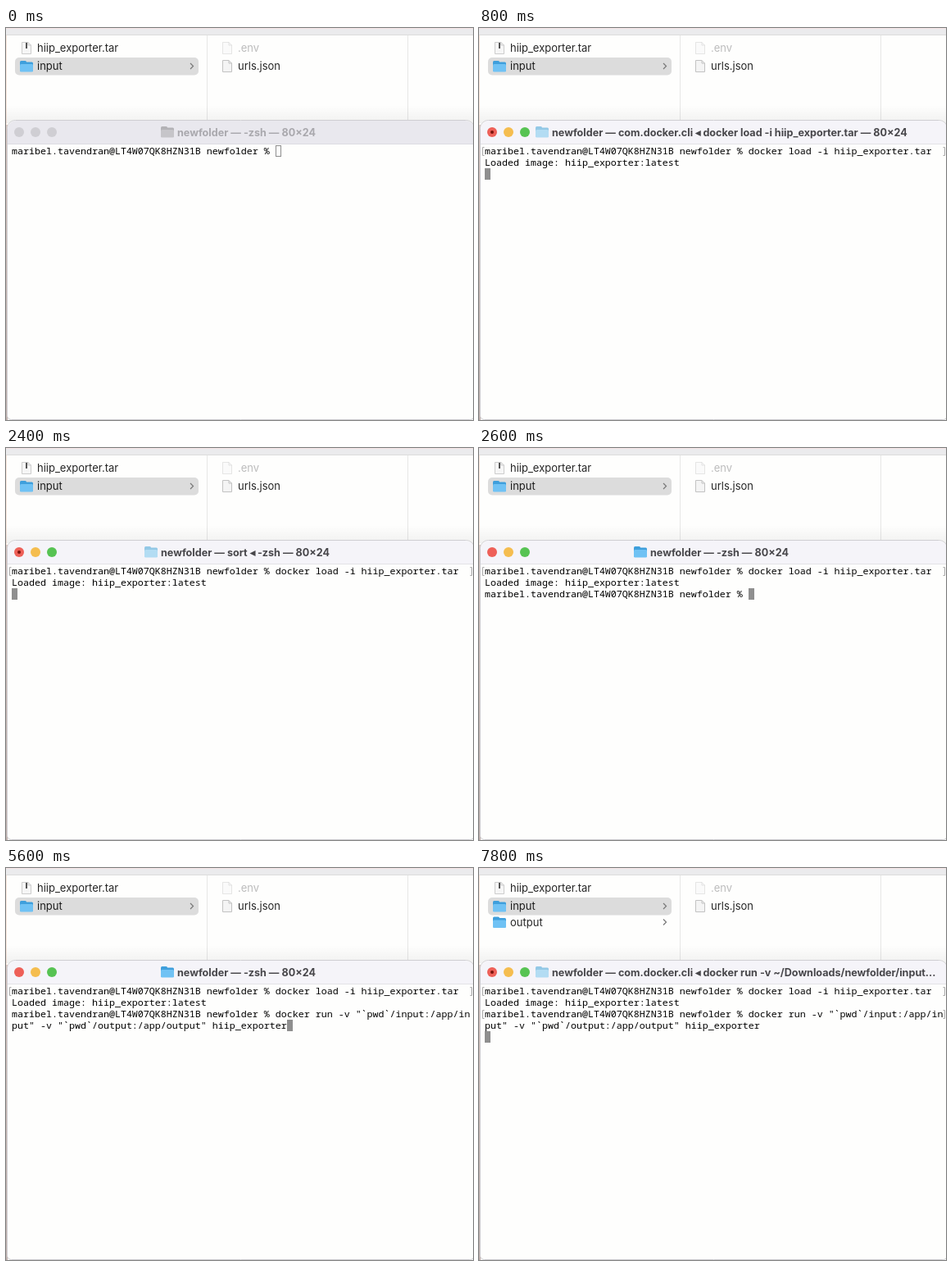
An HTML page with a canvas that plays this animation: 570x478 px, repeating every 8 s.

```html
<!DOCTYPE html>
<html lang="en">
<head>
<meta charset="utf-8">
<title>Terminal session</title>
<style>
html, body { margin: 0; width: 570px; height: 478px; overflow: hidden; background: #fefefd; }
canvas { display: block; }
</style>
</head>
<body>
<canvas id="stage" width="570" height="478"></canvas>
<script>
const ctx = document.getElementById('stage').getContext('2d');
const LOOP = 8000, CELL = 7, ROW = 14, LEFT = 7, TOP = 143;
const MONO = '500 11.667px "Noto Sans Mono", "DejaVu Sans Mono", monospace';
const UI = '13px Inter, "Open Sans", sans-serif';
const BOLD = '700 12.6px Inter, "Open Sans", sans-serif';

const PROMPT = 'maribel.tavendran@LT4W07QK8HZN31B newfolder % ';
const LOAD = 'docker load -i hiip_exporter.tar';
const RUN = ['docker run -v "`pwd`/input:/app/in', 'put" -v "`pwd`/output:/app/output" hiip_exporter'];
const LOADED = 'Loaded image: hiip_exporter:latest';

const SHELL = { x: 189, text: 'newfolder — -zsh — 80×24' };
const LOADING = { x: 69, text: 'newfolder — com.docker.cli ◂ docker load -i hiip_exporter.tar — 80×24', busy: true };
const SORT = { x: 169, text: 'newfolder — sort ◂ -zsh — 80×24', busy: true };
const RUNNING = { x: 69, text: 'newfolder — com.docker.cli ◂ docker run -v ~/Downloads/newfolder/input...', busy: true };

function rounded(x, y, w, h, r, fill, stroke) {
  ctx.beginPath();
  ctx.roundRect(x, y, w, h, r);
  if (fill) { ctx.fillStyle = fill; ctx.fill(); }
  if (stroke) { ctx.strokeStyle = stroke; ctx.lineWidth = 1; ctx.stroke(); }
}

function rect(x, y, w, h, color) {
  ctx.fillStyle = color;
  ctx.fillRect(x, y, w, h);
}

function label(text, x, y, font, color) {
  ctx.font = font;
  ctx.fillStyle = color;
  ctx.fillText(text, x, y);
}

function dot(x, y, r, color) {
  ctx.beginPath();
  ctx.arc(x, y, r, 0, 7);
  ctx.fillStyle = color;
  ctx.fill();
}

function fade(y0, y1, from, to) {
  const g = ctx.createLinearGradient(0, y0, 0, y1);
  g.addColorStop(0, from);
  g.addColorStop(1, to);
  return g;
}

function folder(x, y, back, front) {
  rounded(x, y, 8, 5, 1.5, back);
  rounded(x, y + 1.5, 16, 11.5, 1.5, back);
  rounded(x, y + 4, 16, 9.5, 1.5, front);
}

function page(x, y, alpha) {
  ctx.save();
  ctx.globalAlpha = alpha;
  ctx.beginPath();
  ctx.moveTo(x, y);
  ctx.lineTo(x + 7.5, y);
  ctx.lineTo(x + 11, y + 3.5);
  ctx.lineTo(x + 11, y + 14);
  ctx.lineTo(x, y + 14);
  ctx.closePath();
  ctx.fillStyle = '#f4f4f4';
  ctx.fill();
  ctx.strokeStyle = '#c2c2c2';
  ctx.lineWidth = 1;
  ctx.stroke();
  ctx.beginPath();
  ctx.moveTo(x + 7.5, y);
  ctx.lineTo(x + 7.5, y + 3.5);
  ctx.lineTo(x + 11, y + 3.5);
  ctx.stroke();
  ctx.restore();
}

function chevron(y) {
  ctx.beginPath();
  ctx.moveTo(225, y - 3.5);
  ctx.lineTo(228.5, y);
  ctx.lineTo(225, y + 3.5);
  ctx.strokeStyle = '#777';
  ctx.lineWidth = 1.2;
  ctx.stroke();
}

function finder(hasOutput) {
  rect(0, 0, 570, 478, '#fefefd');
  rect(0, 0, 570, 8, '#ebebed');
  rect(0, 0, 570, 1, '#f3e3e3');
  rect(0, 8, 570, 1, '#dcdcdc');
  rect(0, 9, 1, 110, '#f5e3d9');
  rect(245, 9, 1, 104, '#e6e6e6');
  rect(490, 9, 1, 104, '#e6e6e6');

  rounded(11, 36, 224, 21.5, 5, '#dcdcdc');
  page(19.5, 17.5, 0.8);
  rect(24, 18, 2, 7, '#555');
  folder(17, 40, '#3f9fdc', '#70c2f4');
  label('hiip_exporter.tar', 38, 29, UI, '#262626');
  label('input', 38, 51, UI, '#1c1c1c');
  chevron(46.5);
  if (hasOutput) {
    folder(17, 59.5, '#3f9fdc', '#70c2f4');
    label('output', 38, 71, UI, '#262626');
    chevron(66);
  }
  page(264.5, 17.5, 0.4);
  label('.env', 283, 29, UI, '#bcbcbc');
  page(264.5, 39.5, 1);
  label('urls.json', 283, 51, UI, '#262626');
}

function terminalFrame(title, focused) {
  rect(0, 94, 570, 22, fade(94, 116, 'rgba(0,0,0,0)', 'rgba(0,0,0,.05)'));
  rect(0, 118, 2, 360, fade(118, 400, '#d6c2bc', '#bfb0ac'));
  rounded(1.5, 112.5, 570, 365, [10, 10, 5, 5], '#fefefd', '#cfced2');
  rounded(2, 113, 569, 28.5, [10, 10, 0, 0], focused ? '#f5f4f9' : '#e9e8ee');
  rect(2, 141, 568, 1, focused ? '#e3e2e6' : '#dddce2');

  const lights = focused ? ['#ee6058', '#f5bd4f', '#57c353'] : Array(3).fill('#cfced3');
  lights.forEach((c, i) => dot(16 + 20 * i, 127, 6, c));
  if (title.busy) dot(16, 127, 2, '#7a130d');

  if (!focused) folder(title.x, 120, '#b3b2b6', '#c6c5c9');
  else if (title.busy) folder(title.x, 120, '#93c8e6', '#b3dcf3');
  else folder(title.x, 120, '#3f9fdc', '#70c2f4');
  label(title.text, title.x + 20, 131.5, BOLD, focused ? '#47464a' : '#a9a8ad');
}

function line(row, text) {
  label(text, LEFT, TOP + ROW * row + 11, MONO, '#000');
}

// Marks at both ends of an entered command row
function marks(row) {
  const y = TOP + ROW * row + 2;
  ctx.strokeStyle = '#a8a8a8';
  ctx.lineWidth = 1;
  for (const [x, d] of [[4.5, 2], [568.5, -2]]) {
    ctx.beginPath();
    ctx.moveTo(x + d, y + 0.5);
    ctx.lineTo(x, y + 0.5);
    ctx.lineTo(x, y + 10.5);
    ctx.lineTo(x + d, y + 10.5);
    ctx.stroke();
  }
}

function cursor(row, col, hollow) {
  const x = LEFT + CELL * col, y = TOP + ROW * row;
  if (hollow) {
    ctx.strokeStyle = '#8e8e8e';
    ctx.lineWidth = 1;
    ctx.strokeRect(x + 0.5, y + 0.5, 6, 13);
  } else rect(x, y, 7, 14, '#8f8f8f');
}

function titleAt(t) {
  if (t < 600) return SHELL;
  if (t < 1800) return LOADING;
  if (t < 2600) return SORT;
  return t < 7400 ? SHELL : RUNNING;
}

function draw(t) {
  const focused = t >= 200;
  finder(t >= 7800);
  terminalFrame(titleAt(t), focused);

  if (t >= 7200) cursor(4, 0);
  else if (t >= 2800) cursor(3, RUN[1].length);
  else if (t >= 2600) cursor(2, PROMPT.length);
  else if (t >= 800) cursor(2, 0);
  else if (t >= 400) cursor(1, 0);
  else cursor(0, PROMPT.length + (focused ? LOAD.length : 0), !focused);

  line(0, PROMPT + (focused ? LOAD : ''));
  if (t >= 400) marks(0);
  if (t >= 800) line(1, LOADED);
  if (t >= 2600) line(2, PROMPT + (t >= 2800 ? RUN[0] : ''));
  if (t >= 2800) line(3, RUN[1]);
  if (t >= 7200) marks(2);
}

function tick() {
  draw(performance.now() % LOOP);
  requestAnimationFrame(tick);
}
tick();
</script>
</body>
</html>
```
